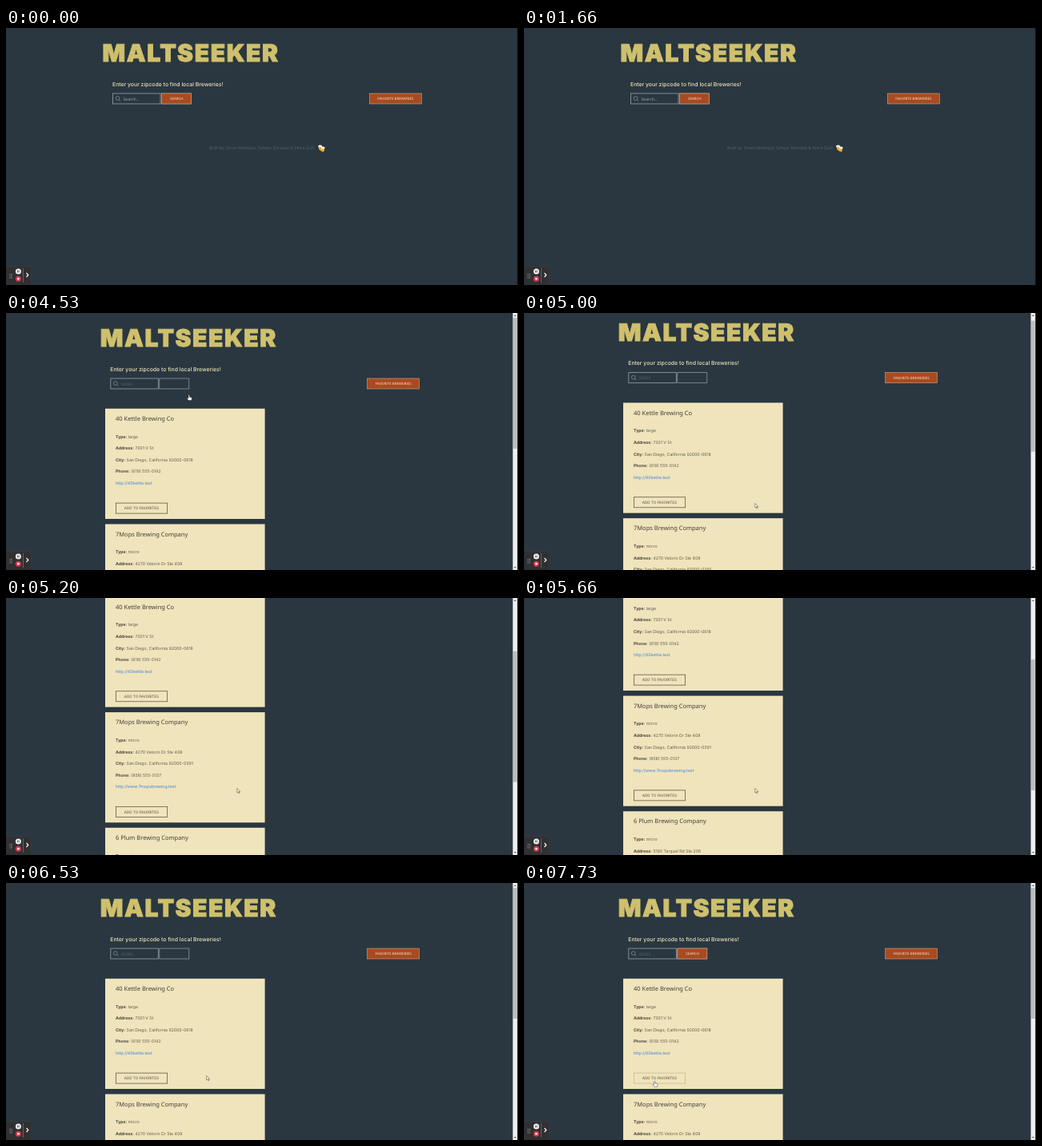
An HTML page for the animation above (8 s loop, 640 by 322 pixels).

```html
<!DOCTYPE html>
<html lang="en">
<head>
<meta charset="utf-8">
<title>Brewery search</title>
<style>
  html, body { margin: 0; width: 100%; height: 100%; overflow: hidden; background: #2a3740; }
  svg { display: block; width: 100%; height: 100%; }
  text { font-family: Inter, sans-serif; text-rendering: geometricPrecision; white-space: pre; }
  .noto { font-family: "Noto Sans", sans-serif; }
  .logo { font-size: 30px; font-weight: 900; letter-spacing: 1.6px; fill: #cfc06d; stroke: #cfc06d; stroke-width: .9px; }
  .lead { font-size: 6.86px; font-weight: 500; fill: #eee5bb; }
  .label { font-size: 4.45px; fill: #f3e9c6; text-anchor: middle; }
  .field { font-size: 5.1px; }
  .button { fill: #a84a22; stroke: #c9ad7e; stroke-width: .6px; }
  .name { font-size: 7.5px; fill: #463f3b; }
  .row { font-size: 5.2px; fill: #625b50; }
  .row tspan { font-weight: 700; fill: #4a443d; }
  .link { font-size: 5.2px; fill: #3f80e6; }
  .add { font-size: 4.6px; fill: #544c42; text-anchor: middle; }
</style>
</head>
<body>
<svg viewBox="0 0 640 322">
  <rect width="640" height="322" fill="#2a3740"/>
  <g id="page">
    <g id="header">
      <text class="logo" x="120.5" y="42">MALTSEEKER</text>
      <text class="lead" x="133" y="72.8">Enter your zipcode to find local Breweries!</text>
      <rect x="133.5" y="82" width="59.5" height="13" fill="none" stroke="#94a3a6" stroke-width=".8"/>
      <g fill="none" stroke="#8b979b" stroke-width=".7">
        <circle cx="139.5" cy="88" r="2.4"/>
        <path d="M141.2 89.8l1.9 1.9"/>
      </g>
      <text id="field" class="noto field" x="146.5" y="90.6"></text>
      <rect id="caret" x="146.2" y="85.7" width=".5" height="6" fill="#8f999d"/>
      <rect x="194.5" y="82" width="37" height="13" fill="none" stroke="#98a3a0" stroke-width=".7"/>
      <g id="search">
        <rect class="button" x="194.5" y="82" width="37" height="13"/>
        <text class="noto label" x="213.3" y="90">SEARCH</text>
      </g>
      <rect class="button" x="454.3" y="82" width="65" height="13"/>
      <text class="noto label" x="486.8" y="90">FAVORITE BREWERIES</text>
    </g>
    <g id="footer">
      <text class="noto" x="254" y="152.4" font-size="5.16" fill="#53616a">Built by: Orven Maltique, Selwyn Dorvane &amp; Petra Quill</text>
      <g>
        <rect x="390.8" y="147.8" width="4.6" height="5" rx="1" fill="#e0a538" transform="rotate(-14 393 150)"/>
        <rect x="393.4" y="149.8" width="4.6" height="5" rx="1" fill="#f0b02c" transform="rotate(14 396 152)"/>
        <ellipse cx="392.6" cy="148" rx="2.6" ry="1.5" fill="#f2ead8"/>
        <ellipse cx="396.2" cy="149.9" rx="2.4" ry="1.5" fill="#fff6e4"/>
      </g>
    </g>
    <g id="results"></g>
  </g>
  <rect x="639" width="1" height="322" fill="#0b1013"/>
  <g id="scrollbar">
    <rect x="633.5" width="5.7" height="322" fill="#efefef"/>
    <path d="M635 4l1.4-1.8L637.8 4zM635 318l1.4 1.8 1.4-1.8z" fill="#555"/>
    <rect id="thumb" x="634" y="6" width="4.7" height="164" fill="#bdbdbd"/>
  </g>
  <g id="recorder">
    <rect x="-3" y="298.9" width="34.8" height="26" rx="2" fill="#303032" stroke="#3c3d3f" stroke-width=".7"/>
    <path d="M4.3 308.6h3.6M4.3 310.8h3.6M4.3 313h3.6" stroke="#999" stroke-width=".9" stroke-dasharray="1 .4"/>
    <circle cx="15.4" cy="305" r="3.5" fill="#f4f4f4"/>
    <path d="M14.6 303.6v2.8M16.2 303.6v2.8" stroke="#333" stroke-width=".8"/>
    <circle cx="15.4" cy="314.2" r="3.5" fill="#d63a4c"/>
    <rect x="14.2" y="313" width="2.4" height="2.4" fill="#fff"/>
    <path d="M21.5 301v18" stroke="#77797b" stroke-width=".7"/>
    <path d="M25.5 307l2.4 2.5-2.4 2.5" fill="none" stroke="#fff" stroke-width="1.1"/>
  </g>
  <g id="cursor" stroke="#222" stroke-width=".45" stroke-linejoin="round" fill="#fff">
    <path id="arrow" d="M0 0v5.4l1.3-1.1.9 2 .9-.4-.9-1.9h1.7z"/>
    <path id="hand" d="M-.7.5q.7-.9 1.4 0v2.2l2.3.5q.8.3.7 1.1l-.6 2.7h-3.6l-2-2.6q.4-.9 1.8 0z"/>
  </g>
</svg>
<script>
const LOOP = 8000, ZIP = "92000";
const KEY_TIMES = [2000, 2050, 2090, 2130, 3060];
const BLINK = 533, FIRST_BLINK = 60, RESULTS_AT = 4000;
const $ = id => document.getElementById(id);

const breweries = [
  { name: "40 Kettle Brewing Co", type: "large", address: "7301 V St",
    zip: "92000-0618", phone: "(619) 555-0142", url: "http://40kettle.test" },
  { name: "7Mops Brewing Company", type: "micro", address: "4270 Velorin Dr Ste 408",
    zip: "92000-0391", phone: "(858) 555-0137", url: "http://www.7mopsbrewing.test" },
  { name: "6 Plum Brewing Company", type: "micro", address: "5190 Tarquel Rd Ste 206",
    zip: "92000-0274", phone: "(858) 555-0116", url: "http://www.6plumbrewing.test" }
];

function card(b, i) {
  const rows = [["Type", b.type], ["Address", b.address],
    ["City", "San Diego, California " + b.zip], ["Phone", b.phone]];
  return `<g transform="translate(124 ${119.8 + i * 144.7})">
    <rect width="199.6" height="138.2" fill="#efe4bb"/>
    <text class="noto name" x="13" y="15.2">${b.name}</text>
    ${rows.map(([key, value], r) =>
      `<text class="row" x="13" y="${36.9 + r * 14.6}"><tspan>${key}:</tspan> ${value}</text>`).join("")}
    <text class="link" x="13" y="95.2">${b.url}</text>
    <rect class="outline" x="13.4" y="118.3" width="64.2" height="13" fill="none" stroke="#655c4b" stroke-width=".8"/>
    <text class="add" x="45.4" y="126.5">ADD TO FAVORITES</text>
  </g>`;
}
$("results").innerHTML = breweries.map(card).join("");
const firstOutline = document.querySelector(".outline");

// Eased progress from 0 to 1 between two times
function ease(t, from, to) {
  const p = Math.min(1, Math.max(0, (t - from) / (to - from)));
  return p * p * (3 - 2 * p);
}

const pointerStops = [[3660, 184, 112], [3880, 214, 89], [4200, 214, 89], [4480, 228.7, 102.5],
  [4600, 228.7, 102.5], [4950, 288.8, 238.5], [6260, 288.8, 238.5], [7000, 163.4, 248.3]];

function pointerAt(t) {
  let [, x, y] = pointerStops[0];
  for (let i = 1; i < pointerStops.length; i++) {
    const [from, x0, y0] = pointerStops[i - 1], [to, x1, y1] = pointerStops[i];
    const p = ease(t, from, to);
    x += (x1 - x0) * p;
    y += (y1 - y0) * p;
  }
  return [x, y];
}

const show = (id, on) => $(id).setAttribute("visibility", on ? "visible" : "hidden");
const move = (id, x, y) => $(id).setAttribute("transform", `translate(${x} ${y})`);

function draw(t) {
  const typed = KEY_TIMES.filter(k => k <= t).length;
  const blinkStart = typed ? KEY_TIMES[typed - 1] : FIRST_BLINK;
  $("field").textContent = typed ? ZIP.slice(0, typed) : "Search...";
  $("field").setAttribute("fill", typed ? "#56636b" : "#a0a9ac");
  $("caret").setAttribute("x", 146.2 + typed * 2.9);
  show("caret", t < 3900 && Math.floor((t - blinkStart) / BLINK) % 2 === 0);

  const found = t >= RESULTS_AT;
  show("results", found);
  show("scrollbar", found);
  show("footer", !found);
  move("header", found ? -2.7 : 0, 0);

  const scroll = 207 * (ease(t, 4950, 5400) - ease(t, 5450, 6015));
  move("page", 0, -scroll);
  move("thumb", 0, scroll / 2);

  $("search").setAttribute("opacity", 1 - ease(t, 3800, 4100) + ease(t, 7350, 7650));
  firstOutline.setAttribute("stroke-opacity", 1 - .7 * ease(t, 6950, 7250));

  const hand = t > 3800 && t < 4620 || t > 6930;
  const visible = t > 3660;
  move("cursor", ...pointerAt(t));
  show("arrow", visible && !hand);
  show("hand", visible && hand);
}

function tick() {
  draw(performance.now() % LOOP);
  requestAnimationFrame(tick);
}
tick();
</script>
</body>
</html>
```
